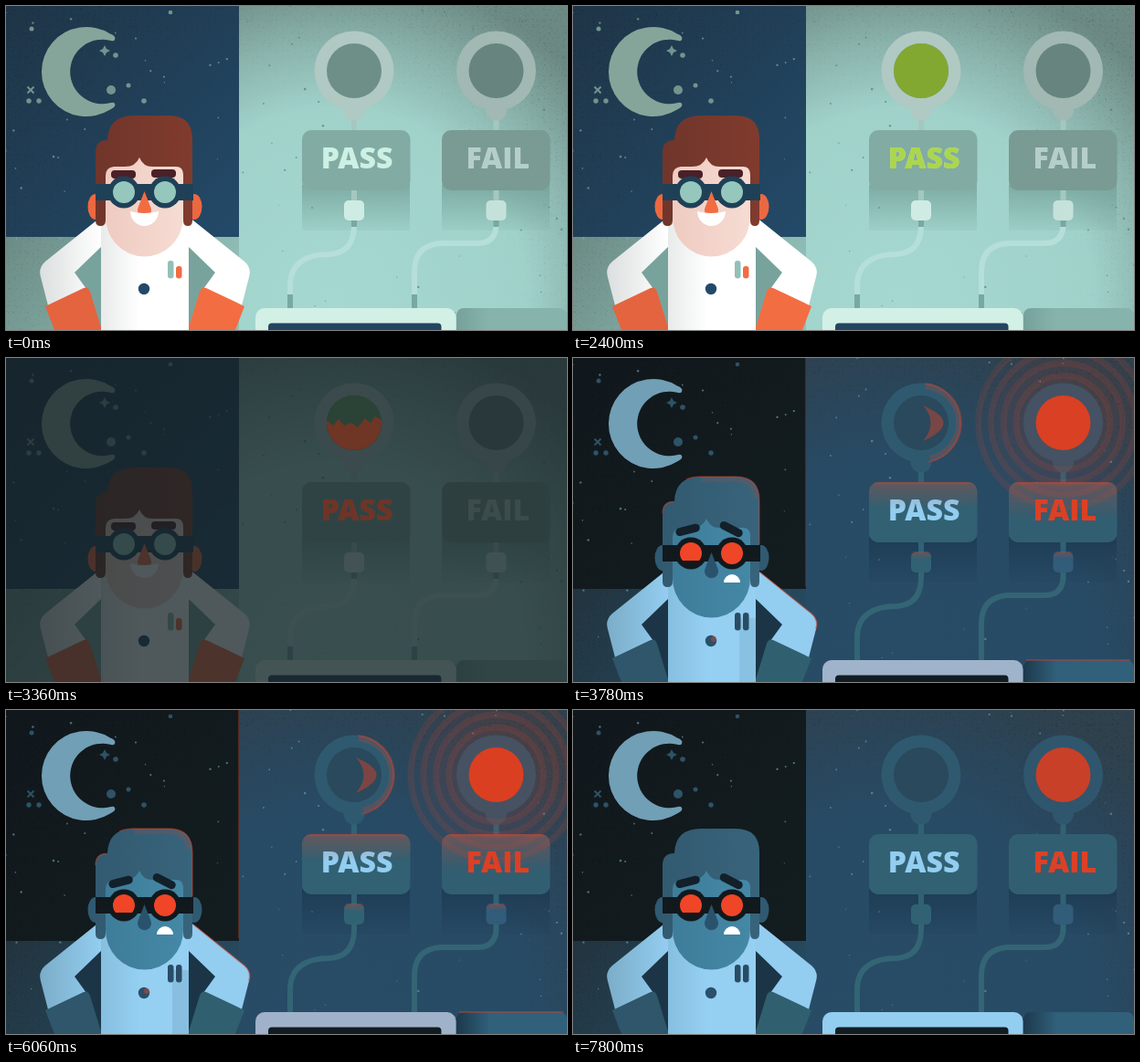
An HTML page that plays this animation: 614x355 px, repeating every 8040 ms.

```html
<!DOCTYPE html>
<html lang="en">
<head>
<meta charset="utf-8">
<title>Pass or fail</title>
<style>
html, body { margin: 0; width: 100%; height: 100%; overflow: hidden; background: #14202a; }
svg { display: block; width: 614px; height: 355px; }
text { font: 800 32px "Open Sans", sans-serif; }
</style>
</head>
<body>
<svg id="stage" viewBox="0 0 614 355" xmlns="http://www.w3.org/2000/svg"></svg>
<script>
const LOOP = 8040, STEP = 60;
const DIM_START = 3240, DARK = 3400, LIT = 3600, PULSE_END = 7800;

const day = {
  id: 'day', window: ['#1f3547', '#234a69'], floor: ['#6c8c86', '#90bfb7'],
  wall: ['#a5d8d0', '#a0d2ca', '#8ab3ac', '#6c8983'],
  moon: '#86a59a', star: '#71958e', gap: '#78a39d',
  sleeve: ['#dcdfdf', '#ffffff'], coat: ['#e8ebea', '#ffffff'],
  cuff: ['#e4643f', '#f36d43'], button: '#23496a', pens: ['#92c0b8', '#f26c42'],
  hair: ['#70352b', '#803b2d'], face: ['#efcbc1', '#f6dcd3'], ear: '#ec6841', nose: '#f26c42',
  brow: '#4b2028', glasses: '#1f4157', lens: '#96c7bd',
  rings: ['#b0c9c3', '#a1b9b2'], disc: ['#6e8f88', '#67857e'], boxes: ['#82aba3', '#7a9a94'],
  words: ['#cdf0e5', '#b5cfc8'], stem: '#a3c8c0', plug: ['#cfece4', '#c5e2da'],
  cable: '#b5dfd8', stub: '#78a8a2', panel: '#d3f0e6', screen: '#23455f', side: ['#76a19b', '#86b4ac']
};
const night = {
  id: 'night', window: ['#11181d', '#131d1f'], floor: ['#22343f', '#264a60'],
  wall: ['#284b66', '#284b65', '#2a465b', '#2f414d'],
  moon: '#719fb5', star: '#2e5266', gap: '#1b3547',
  sleeve: ['#7badc8', '#93cdf0'], coat: ['#86bfdf', '#95cff2'],
  cuff: ['#2f566b', '#30606f'], button: '#2b4f6a', pens: ['#294c66', '#294c66'],
  hair: ['#325a70', '#38647b'], face: ['#3e7d99', '#4488a6'], ear: '#2f5a71', nose: '#2b526c',
  brow: '#13202a', glasses: '#11191d', lens: '#f04527',
  rings: ['#2f596f', '#2f566d'], disc: ['#2a495c', '#2a495c'], boxes: ['#316173', '#325e72'],
  words: ['#93cdf0', '#de4025'], stem: '#306274', plug: ['#306274', '#315c7a'],
  cable: '#336575', stub: '#336575', panel: '#93cdf0', screen: '#111c22', side: ['#1c394c', '#30607a']
};

const rect = (x, y, w, h, fill, r = 0, more = '') =>
  `<rect x="${x}" y="${y}" width="${w}" height="${h}" rx="${r}" fill="${fill}" ${more}/>`;
const disc = (x, y, r, fill, more = '') => `<circle cx="${x}" cy="${y}" r="${r}" fill="${fill}" ${more}/>`;
const path = (d, fill, more = '') => `<path d="${d}" fill="${fill}" ${more}/>`;
const word = (text, x, fill) => `<text x="${x}" y="177.5" fill="${fill}">${text}</text>`;
const line = (d, color, width, more = '') => path(d, 'none', `stroke="${color}" stroke-width="${width}" ${more}`);
const flip = shape => `<g transform="matrix(-1 0 0 1 304 0)">${shape}</g>`;
const blend = (id, [from, to], x2 = 1, y2 = 0) =>
  `<linearGradient id="${id}" x2="${x2}" y2="${y2}"><stop stop-color="${from}"/><stop offset="1" stop-color="${to}"/></linearGradient>`;

let seed = 11;
const random = () => (seed = seed * 16807 % 2147483647) / 2147483647;
const specks = Array.from({ length: 105 }, () => [random() * 614, random() * 355, .5 + random() * .8]);

const PASS_X = 344.7, FAIL_X = 503.4;
const HAIR = 'M98 235V160Q98 147 111 147Q112 120 140 120H178Q204 120 204 146V235Q204 241 199 241Q194 241 194 235V185Q194 176 186 176H160Q150 176 146 166Q142 176 130 176H118Q109 177 109 186V235Q109 241 103.5 241Q98 241 98 235Z';
const SLEEVE = 'M104 231L43 280Q35 287 38 297L47 332L88 310L75 292L104 264Z';
const CUFF = 'M43 329L85 309Q90 307 92 313L104 352V355H53Z';
const MOON = 'M114 30.5A49 49 0 1 0 114 113.500Q121 110 119 107Q118 105 115 106A35.300 35.300 0 1 1 115 38Q118 39 119 37Q121 33 114 30.500Z';
const PASS_CABLE = 'M381 240Q381 271 353 272C329 272 311 282 311 306V331';
const FAIL_CABLE = 'M536.500 240Q536 260 516 260H476Q447 262 447 291V331';

function sign(c, i) {
  const x = i ? 536.5 : 381, left = i ? 477 : 324;
  return rect(left, 196, 118, 50, `url(#${c.id}Shade)`)
    + rect(x - 3, 114, 6, 24, c.stem) + disc(x, 114, 11.5, c.rings[i])
    + disc(x, 71, 43.5, c.rings[i]) + disc(x, 71, 30, c.disc[i])
    + rect(left, 136, 118.5, 66, c.boxes[i], 10)
    + rect(x - 3, 202, 6, 14, c.stem)
    + line(i ? FAIL_CABLE : PASS_CABLE, c.cable, 6)
    + rect(x - 3, 233, 6, 9, c.stub) + rect(i ? 444 : 308, 316, 6, 15, c.stub)
    + rect(x - 11, 213, 22, 22, c.plug[i], 5)
    + word(i ? 'FAIL' : 'PASS', i ? FAIL_X : PASS_X, c.words[i]);
}

function head(c) {
  const isNight = c === night;
  const brows = isNight
    ? rect(112, 174, 27, 9, c.brow, 4.5, 'transform="rotate(-14 125 178)"') + rect(160, 173, 27, 9, c.brow, 4.5, 'transform="rotate(27 173 177)"')
    : rect(115, 180, 27, 9, c.brow, 4) + rect(159, 179, 27, 9, c.brow, 4);
  const mouth = isNight ? 'M165 236A9 9 0 0 1 183 236Z' : 'M136 225Q151 229 167 225A15.5 16 0 0 1 136 225Z';
  const ear = `<ellipse cx="98" cy="${isNight ? 209 : 220}" rx="8.5" ry="14" fill="${c.ear}"/>`;
  return `<g transform="translate(0 ${isNight ? 10 : 0})">` + ear + flip(ear)
    + path('M109 164H194V231A42.500 43.500 0 0 1 109 231Z', `url(#${c.id}Face)`)
    + path(HAIR, `url(#${c.id}Hair)`) + brows
    + rect(98, 195, 107, 18, c.glasses)
    + disc(129, 204, 17.5, c.glasses) + disc(174, 204, 17.5, c.glasses)
    + path('M151.500 203L158.500 221A7.500 7.500 0 1 1 144.500 221Z', c.nose)
    + disc(129, 204, 12, c.lens) + disc(174, 204, 12, c.lens)
    + (isNight ? rect(117, 212, 24, 5, c.glasses) : '') + path(mouth, '#fff') + '</g>';
}

function scene(c) {
  const isNight = c === night, n = c.id;
  const fill = name => `url(#${n + name})`;
  const speckColor = x => isNight ? '#6d9bb0' : x < 255 ? '#88a9a0' : '#52786f';
  const stars = [[28, 25, 2.5], [120, 54, 2.8], [115, 92, 5], [134, 87, 2.5], [151, 104, 2.8], [25, 104, 2.7], [36, 104, 2.7], [180, 7, 2.3]];
  const stops = c.wall.map((color, i) => `<stop offset="${[0, .58, .78, 1][i]}" stop-color="${color}"/>`).join('');
  const shade = isNight ? '#1b3850' : '#719f97';
  return `<defs>${blend(n + 'Window', c.window, 1, 1)}${blend(n + 'Floor', c.floor, 1, .3)}
    <radialGradient id="${n}Wall" gradientUnits="userSpaceOnUse" cx="360" cy="322" r="362">${stops}</radialGradient>
    ${blend(n + 'Sleeve', c.sleeve)}${blend(n + 'Coat', c.coat, .45)}${blend(n + 'Hair', c.hair)}${blend(n + 'Face', c.face)}${blend(n + 'Side', c.side, .3)}
    <linearGradient id="${n}Shade" x2="0" y2="1"><stop stop-color="${shade}" stop-opacity=".75"/><stop offset="1" stop-color="${shade}" stop-opacity=".1"/></linearGradient></defs>`
    + rect(255, 0, 359, 355, fill('Wall')) + rect(0, 0, 255, 253, fill('Window')) + rect(0, 253, 255, 102, fill('Floor'))
    + rect(0, 0, 614, 355, '#000', 0, `filter="url(#grain)" mask="url(#edges)" opacity="${isNight ? .3 : .22}"`)
    + path(MOON, c.moon) + stars.map(s => disc(...s, c.star)).join('')
    + path('M108 43L110 47L114 49L110 51L108 55L106 51L102 49L106 47Z', c.star)
    + line('M23.500 88.500L30.500 95.500M30.500 88.500L23.500 95.500', c.star, 2)
    + specks.map(([x, y, r]) => disc(x.toFixed(1), y.toFixed(1), r.toFixed(1), speckColor(x), 'opacity=".65"')).join('')
    + sign(c, 0) + sign(c, 1)
    + rect(493, 331, 121, 40, fill('Side'), 8) + rect(273, 331, 219.5, 40, c.panel, 10) + rect(287, 347.5, 189.5, 20, c.screen, 4)
    + path('M104 264L75 292L104 355Z', c.gap) + path('M200 264L229 292L200 355Z', c.gap)
    + path(SLEEVE, fill('Sleeve')) + flip(path(SLEEVE, c.sleeve[1]))
    + rect(104, 231, 96, 127, fill('Coat')) + path(CUFF, c.cuff[0]) + flip(path(CUFF, c.cuff[1]))
    + disc(151, 310, 6.2, c.button) + rect(177, 279, 6.5, 19.5, c.pens[0], 3) + rect(186, isNight ? 279 : 285, 6.5, isNight ? 19.5 : 13.5, c.pens[1], 3)
    + head(c);
}

// Red light that the alarm throws on edges facing it.
const RED = '#d6452d';
const rims = rect(324, 136, 118.5, 30, 'url(#redTop)', 10) + rect(477, 136, 118.5, 40, 'url(#redTop)', 10)
  + rect(370, 212, 22, 9, 'url(#redTop)', 5) + rect(525.5, 212, 22, 9, 'url(#redTop)', 5)
  + line('M385 28A43.500 43.500 0 0 1 389 114', RED, 2, 'opacity=".4"')
  + line('M386 31A40 40 0 0 1 391 110', RED, 7, 'opacity=".25"')
  + path('M383 52Q428 71 383 91Q400 71 383 52Z', RED, 'opacity=".5"')
  + line('M254.500 0V250', RED, 1.2, 'opacity=".35"')
  + line('M98 170Q98 158 110 157.500M124 133Q130 130 140 130H178Q204 130 204 157V204', RED, 1.4, 'opacity=".5"')
  + line('M201 153Q198 134 178 133H140', RED, 6, 'opacity=".18"')
  + line('M205 235L261 280Q269 287 266 297', RED, 1.6, 'opacity=".6"')
  + path('M273 355V341Q273 331 283 331H482Q492.500 331 492.500 341V355H476.500V348H287V355Z', RED, 'opacity=".2"')
  + line('M496 331H610', RED, 1.3, 'opacity=".6"')
  + rect(182, 285, 18, 70, '#31526f', 0, 'opacity=".12"') + disc(154, 308, 3, RED, 'opacity=".5"');
const halo = [94, 80, 66, 52].map(r =>
  disc(0, 0, r, RED, `fill-opacity=".035" stroke="${RED}" stroke-opacity=".15" stroke-width="7"`)).join('');

const stage = document.getElementById('stage');
stage.innerHTML = `<defs>
  <filter id="grain" x="0" y="0" width="100%" height="100%"><feTurbulence baseFrequency=".85" numOctaves="2" seed="4"/><feColorMatrix values="0 0 0 0 0  0 0 0 0 0  0 0 0 0 0  3 0 0 0 -1.2"/></filter>
  <radialGradient id="edge" gradientUnits="userSpaceOnUse" cx="330" cy="310" r="400"><stop offset=".5" stop-color="#000"/><stop offset=".95" stop-color="#fff"/></radialGradient>
  <mask id="edges">${rect(0, 0, 614, 355, 'url(#edge)')}</mask>
  <linearGradient id="redTop" x2="0" y2="1"><stop stop-color="${RED}" stop-opacity=".65"/><stop offset=".1" stop-color="${RED}" stop-opacity=".3"/><stop offset="1" stop-color="${RED}" stop-opacity="0"/></linearGradient>
  <clipPath id="lenses">${disc(129, 204, 12) + disc(174, 204, 12)}</clipPath>
  <clipPath id="bulb">${disc(381, 71, 30)}</clipPath></defs>
  <g id="day">${scene(day)}
    <g clip-path="url(#lenses)"><g id="glint">${path('M-8 188H24L4 222H-28Z', '#f4fbf5') + path('M-36 188H-27L-47 222H-56Z', '#f4fbf5', 'opacity=".5"')}</g></g>
    <g id="green">${disc(381, 71, 30, '#86ad22') + word('PASS', PASS_X, '#a5d22f')}</g></g>
  <g id="night">${scene(night)}
    <g id="halo">${halo}</g>
    <g id="rims">${rims}</g>
    ${disc(536.5, 71, 30, '#db4023', 'id="alarm"')}</g>
  ${rect(0, 0, 614, 355, 'rgb(20,32,36)', 0, 'id="dim"')}
  <g id="ember">${disc(381, 71, 30, '#2a4337')}
    ${path('M350 67L358 74L364 67L370 74L378 71L385 76L393 66L399 71L404 64L412 68V105H350Z', '#703526', 'clip-path="url(#bulb)"')}
    ${word('PASS', PASS_X, '#703428')}</g>`;

const part = Object.fromEntries([...stage.querySelectorAll('g[id], #alarm, #dim')].map(el => [el.id, el]));
const clamp = v => Math.max(0, Math.min(1, v));
const fade = (name, value) => part[name].setAttribute('opacity', value.toFixed(3));
const wave = (t, start, period) => (1 - Math.cos(2 * Math.PI * (t - start) / period)) / 2;

function draw(t) {
  const dark = t >= DARK;
  const dim = dark ? clamp((LIT - t) / (LIT - DARK)) : clamp((t - DIM_START) / (DARK - DIM_START));
  part.day.style.display = dark ? 'none' : '';
  part.night.style.display = dark ? '' : 'none';
  fade('dim', dim);
  fade('ember', dark ? 0 : clamp(dim * 1.33));

  const sweep = (t - 900) / 900;
  part.glint.setAttribute('transform', `translate(${95 + 118 * clamp(sweep)} 0)`);
  fade('glint', sweep > 0 && sweep < 1 ? .95 : 0);
  fade('green', t < 1830 ? 0 : t < 3180 ? wave(t, 1830, 900) : 1);

  const pulse = t < PULSE_END ? wave(t, 4440, 1120) : 0;
  part.halo.setAttribute('transform', `translate(536.5 71) scale(${.85 + .15 * pulse})`);
  fade('halo', pulse);
  fade('rims', pulse);
  fade('alarm', .9 + .1 * pulse);
}

function tick() {
  const t = performance.now() % LOOP;
  draw(Math.floor(t / STEP) * STEP);
  requestAnimationFrame(tick);
}
tick();
</script>
</body>
</html>
```
